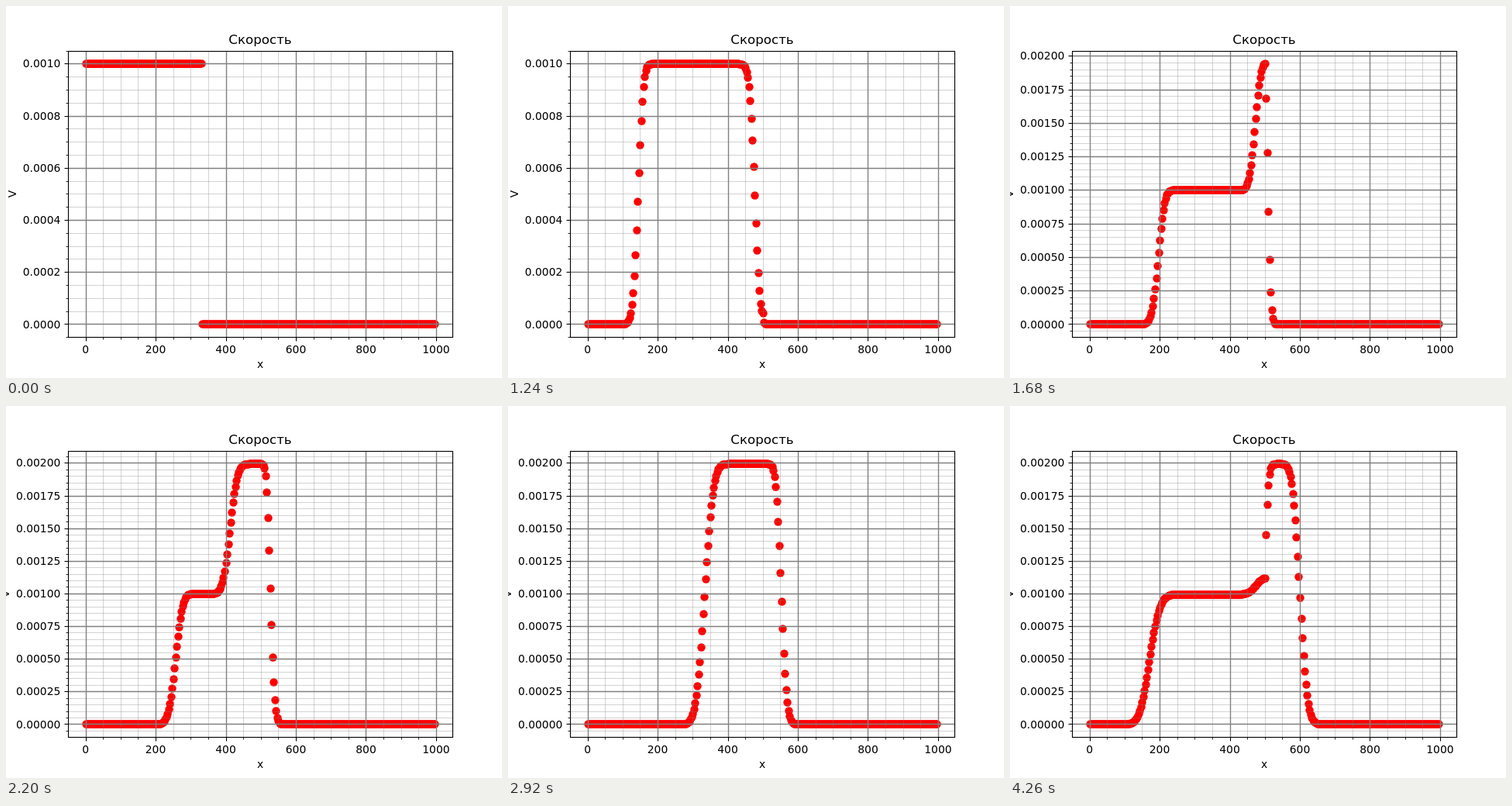
An HTML page for the animation above (4280 ms loop, 640x480 px).

```html
<!DOCTYPE html>
<html lang="ru">
<head>
<meta charset="utf-8">
<style>
  html, body { margin: 0; width: 100%; height: 100%; overflow: hidden; background: #fff; }
  svg { display: block; }
  text { font-family: "DejaVu Sans", sans-serif; font-size: 13.89px; fill: #000; }
  .title { font-size: 16.67px; }
  .mid { text-anchor: middle; }
  .end { text-anchor: end; }
  .dots { fill: #f00; }
  .major { stroke: #808080; stroke-width: 1.39; }
  .minor { stroke: #808080; stroke-width: 1; opacity: .34; }
  .tick { stroke: #000; stroke-width: 1.11; }
  .tick.small { stroke-width: .83; }
  .frame { fill: none; stroke: #000; stroke-width: 1.11; }
</style>
</head>
<body>
<svg width="640" height="480" viewBox="0 0 640 480">
  <g class="dots" id="dots"></g>
  <g id="xAxis"></g>
  <g id="yAxis"></g>
  <rect class="frame" x="80.5" y="58.5" width="496" height="369"/>
  <text class="title mid" x="328" y="49">Скорость</text>
  <text class="mid" x="328" y="467">x</text>
  <text class="mid" id="yLabel">V</text>
</svg>
<script>
const FRAME_MS = 20, FRAMES = 214;
const NODES = 300, EDGE = 100, INTERFACE = 150, DX = 1000 / NODES;
const COURANT_LEFT = 0.7, COURANT_RIGHT = 0.21;
const TRANSMIT = 2 / 1.003, REFLECT = TRANSMIT - 1;

const get = id => document.getElementById(id);
const snap = v => Math.floor(v + 0.5) + 0.5;
const xScale = 496 / (1.1 * DX * (NODES - 1));
const toX = x => 80 + 496 * 0.05 / 1.1 + x * xScale;
const toY = (v, top) => 410.4 - 336 * v / top;
const line = (cls, x1, y1, x2, y2) =>
  `<line class="${cls}" x1="${x1}" y1="${y1}" x2="${x2}" y2="${y2}"/>`;

// Upwind acoustic waves; velocities are in units of 0.001.
function simulate() {
  let right = Array.from({ length: NODES }, (_, i) => i < EDGE ? 1 : 0);
  let left = new Array(NODES).fill(0);
  let passed = new Array(NODES).fill(0);
  const history = [];
  for (let n = 0; n < FRAMES; n++) {
    history.push(right.map((r, i) =>
      i > INTERFACE ? passed[i] : r + left[i]));
    const nextRight = right.map((r, i) =>
      i === 0 || i > INTERFACE ? 0 : r + COURANT_LEFT * (right[i - 1] - r));
    const nextLeft = left.map((l, i) =>
      i < INTERFACE ? l + COURANT_LEFT * (left[i + 1] - l) : 0);
    nextLeft[INTERFACE] = REFLECT * nextRight[INTERFACE];
    const nextPassed = passed.map((s, i) =>
      i > INTERFACE ? s + COURANT_RIGHT * (passed[i - 1] - s) : 0);
    nextPassed[INTERFACE] = TRANSMIT * nextRight[INTERFACE];
    [right, left, passed] = [nextRight, nextLeft, nextPassed];
  }
  return history;
}

function drawXAxis() {
  let out = "";
  for (let v = 0; v <= 1000; v += 50) {
    const x = snap(toX(v)), major = v % 200 === 0;
    out += line(major ? "major" : "minor", x, 58, x, 427);
    out += line(major ? "tick" : "tick small", x, 427.5, x, major ? 432.5 : 430.5);
    if (major) out += `<text class="mid" x="${toX(v)}" y="448">${v}</text>`;
  }
  get("xAxis").innerHTML = out;
}

function drawYAxis(top) {
  const fine = 1.1 * top / 9 > 0.2;
  const perMajor = fine ? 5 : 4;
  const first = Math.ceil(-top - 1e-9), last = Math.floor(21 * top + 1e-9);
  let out = "";
  for (let k = first; k <= last; k++) {
    const exact = toY(k * 0.05, top), y = snap(exact), major = k % perMajor === 0;
    out += line(major ? "major" : "minor", 80, y, 576, y);
    out += line(major ? "tick" : "tick small", major ? 75.5 : 77.5, y, 80.5, y);
    if (major) {
      const label = (k * 0.00005).toFixed(fine ? 5 : 4);
      out += `<text class="end" x="70.3" y="${Math.round(exact + 5.1)}">${label}</text>`;
    }
  }
  get("yAxis").innerHTML = out;
  get("yLabel").setAttribute("transform", `translate(${fine ? 4.2 : 13} 242.5) rotate(-90)`);
}

const history = simulate();
get("dots").innerHTML = history[0].map((_, i) =>
  `<circle cx="${snap(toX(i * DX))}" r="5.2"/>`).join("");
const dots = [...get("dots").children];
let shown = -1;

function render(time) {
  const n = Math.floor(time / FRAME_MS) % FRAMES;
  if (n === shown) return;
  shown = n;
  const speeds = history[n], top = Math.max(...speeds);
  dots.forEach((dot, i) => dot.setAttribute("cy", snap(toY(speeds[i], top))));
  drawYAxis(top);
}

drawXAxis();
const start = performance.now();
function tick() {
  render(performance.now() - start);
  requestAnimationFrame(tick);
}
tick();
</script>
</body>
</html>
```
